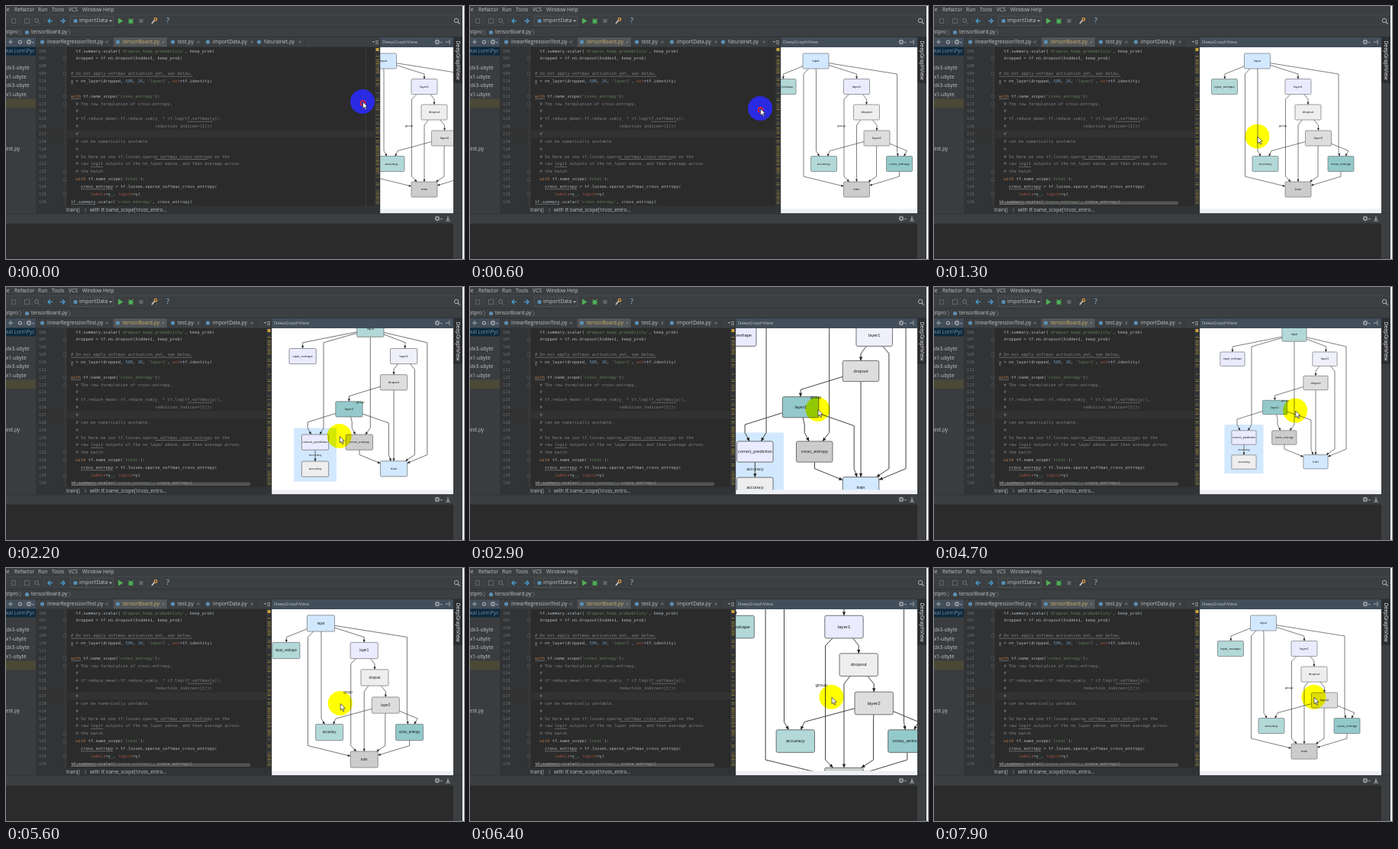
These frames come from a looping animation (600 by 331 pixels, 8000 ms). An HTML page with a canvas:

```html
<!DOCTYPE html>
<html lang="en">
<head>
<meta charset="utf-8">
<title>Graph view in an editor</title>
<style>
html, body { margin: 0; width: 100%; height: 100%; overflow: hidden; background: #2b2b2b; }
canvas { display: block; width: 600px; height: 331px; }
</style>
</head>
<body>
<canvas id="stage" width="600" height="331"></canvas>
<script>
const c = document.getElementById('stage').getContext('2d');
const LOOP = 8000, UI = '"Open Sans", "Noto Sans", sans-serif';
const MONO = '"DejaVu Sans Mono", monospace', ARIAL = '"Liberation Sans", Arial, sans-serif';
const PANEL = '#3c3f41', HEADER = '#434e5b', LINE = '#2f3133', TEXT = '#c0c2c4';
const CODE_SIZE = 5.4, CODE_X = 85, CODE_Y = 59.2, LINE_H = 9.85, CHAR_W = 3.25;

const code = `  tf.summary.scalar('dropout_keep_probability', keep_prob)
  dropped = tf.nn.dropout(hidden1, keep_prob)

# Do not apply softmax activation yet, see below.
y = nn_layer(dropped, 500, 10, 'layer2', act=tf.identity)

with tf.name_scope('cross_entropy'):
  # The raw formulation of cross-entropy,
  #
  # tf.reduce_mean(-tf.reduce_sum(y_ * tf.log(tf.softmax(y)),
  #                               reduction_indices=[1]))
  #
  # can be numerically unstable.
  #
  # So here we use tf.losses.sparse_softmax_cross_entropy on the
  # raw logit outputs of the nn_layer above, and then average across
  # the batch.
  with tf.name_scope('total'):
    cross_entropy = tf.losses.sparse_softmax_cross_entropy(
        labels=y_, logits=y)
tf.summary.scalar('cross_entropy', cross_entropy)`.split('\n');
// Line, column, length
const underlines = [[3, 0, 49], [4, 0, 1], [6, 0, 4], [9, 47, 10], [14, 34, 21],
  [15, 8, 5], [18, 4, 13], [20, 0, 10]];

const collapsed = {
  w: 34, h: 20, font: 4.2, label: ['group', 457, 157],
  nodes: {
    input: [423.5, 72, '#d2e8fe'], input_reshape: [380.5, 105.5, '#b2d8d8'],
    layer1: [477, 105.5, '#ebebff'], dropout: [490, 139, '#eeeeee'],
    layer2: [503.5, 173, '#dddddd'], accuracy: [434, 206.5, '#b2d8d8'],
    cross_entropy: [533, 206.5, '#93c9ca'], train: [477, 240, '#cccccc']
  },
  edges: [
    ['input', 'input_reshape', [381, 89]], ['input', 'layer1', [477, 89]],
    ['input', 'accuracy', [424, 89], [424, 189.5]], ['input', 'train', [407.5, 89], [407.5, 223]],
    ['input', 'cross_entropy', [530, 89], [530, 189.5]],
    ['layer1', 'dropout', [490, 122]], ['layer1', 'train', [460.5, 122], [460.5, 223]],
    ['dropout', 'layer2', [503.5, 156]], ['dropout', 'train', [477, 156]],
    ['layer2', 'accuracy', [442, 189.5]], ['layer2', 'cross_entropy', [543, 189.5]],
    ['layer2', 'train', [503, 190], [503, 223]], ['cross_entropy', 'train', [533, 223]]
  ]
};
const expanded = {
  w: 32.2, h: 18.4, font: 3.8, label: ['group', 460, 149],
  cluster: [380.5, 180, 51, 64, 'accuracy', 406, 212.5],
  nodes: {
    input: [472, 62, '#b2d8d8'], input_reshape: [391, 94.2, '#ebebff'],
    layer1: [512, 94.2, '#f0f0fa'], dropout: [500, 125.5, '#dddddd'],
    layer2: [446.5, 157.5, '#93c9ca'], correct_prediction: [406, 197, '#ebebff'],
    cross_entropy: [458.8, 197, '#cccccc'], accuracy: [406, 229, '#eeeeee'],
    train: [500, 228.7, '#d2e8fe']
  },
  edges: [
    ['input', 'input_reshape', [391, 78]], ['input', 'correct_prediction', [416, 78], [416, 180]],
    ['input', 'cross_entropy', [472, 78], [472, 180]], ['input', 'layer1', [514, 78]],
    ['input', 'train', [540, 78], [540, 212]],
    ['layer1', 'dropout', [500, 110]], ['layer1', 'train', [525, 110], [525, 212]],
    ['dropout', 'layer2', [446.5, 142]], ['dropout', 'train'],
    ['layer2', 'correct_prediction', [397, 173], [397, 180]],
    ['layer2', 'cross_entropy', [450, 173], [450, 180]],
    ['layer2', 'train', [494, 174], [494, 212]],
    ['cross_entropy', 'train', [459, 212]], ['correct_prediction', 'accuracy']
  ]
};

// Key poses: time, then values
const divider = [[100, 490], [1000, 348]];
const pointer = [[0, 467, 125], [900, 350, 137], [1000, 350, 138], [1300, 423.5, 170.5],
  [1800, 434, 200], [2000, 434, 200], [2900, 455.5, 160], [3600, 483.5, 155], [4500, 483.5, 155],
  [5200, 432, 188], [5350, 432, 188], [5600, 437.7, 177], [6400, 473.5, 168.7], [7100, 480, 168.7],
  [7900, 497.5, 168.7]];
const zoomExpanded = [[2000, 1, 7, 3], [2700, 1.475, -225.5, -75.1],
  [2950, 1.475, -225.5, -75.1], [3700, 1, 0, 0]];
const zoomCollapsed = [[1900, 1, 0, 0], [5400, 1.06, -36.4, -3.9], [5650, 1.06, -36.4, -3.9],
  [6250, 1.48, -216, -79.1], [6400, 1.48, -216, -79.1], [7000, 1.09, -33.6, -12],
  [7100, 1.09, -33.6, -12], [7800, 1, 8, 0]];

function at(keys, t) {
  const i = keys.findIndex(k => k[0] > t);
  if (i < 0) return keys[keys.length - 1].slice(1);
  if (i === 0) return keys[0].slice(1);
  const [a, b] = [keys[i - 1], keys[i]];
  const u = (t - a[0]) / (b[0] - a[0]), e = u * u * (3 - 2 * u);
  return a.slice(1).map((v, n) => v + (b[n + 1] - v) * e);
}

function rect(x, y, w, h, color) {
  c.fillStyle = color;
  c.fillRect(x, y, w, h);
}
function text(s, x, y, size, color = TEXT, font = UI, align = 'left') {
  c.font = `${size}px ${font}`;
  c.textAlign = align;
  c.textBaseline = 'middle';
  c.fillStyle = color;
  c.fillText(s, x, y);
}
function path(points, color, width = 1, fill) {
  c.beginPath();
  points.forEach(p => c.lineTo(p[0], p[1]));
  if (fill) { c.closePath(); c.fillStyle = fill; c.fill(); }
  if (width) { c.strokeStyle = color; c.lineWidth = width; c.stroke(); }
}
function disc(x, y, r, fill) {
  c.beginPath();
  c.arc(x, y, r, 0, 7);
  c.fillStyle = fill;
  c.fill();
}
function ring(x, y, r, color, width = 1) {
  c.beginPath();
  c.arc(x, y, r, 0, 7);
  c.strokeStyle = color;
  c.lineWidth = width;
  c.stroke();
}
function clip(x, y, w, h, draw) {
  c.save();
  c.beginPath();
  c.rect(x, y, w, h);
  c.clip();
  draw();
  c.restore();
}
function gear(x, y) {
  ring(x, y, 2, '#a9abad', 1.3);
  for (let a = 0; a < 6.2; a += Math.PI / 4)
    rect(x + 3 * Math.cos(a) - .5, y + 3 * Math.sin(a) - .5, 1, 1, '#a9abad');
  path([[x + 4, y], [x + 7, y], [x + 5.5, y + 1.7]], '', 0, '#a9abad');
}
function hideIcon(x, y) {
  path([[x, y - 3], [x, y + 1]], '#a9abad');
  path([[x - 2, y], [x + 2, y], [x, y + 2.5]], '', 0, '#a9abad');
  path([[x - 3, y + 3], [x + 3, y + 3]], '#a9abad');
}
function arrowIcon(x, y, dir) {
  path([[x - 3 * dir, y], [x + 3 * dir, y]], '#4a9bd0', 1.3);
  path([[x, y - 3], [x + 3 * dir, y], [x, y + 3]], '#4a9bd0', 1.3);
}

function drawTop() {
  rect(0, 0, 600, 41, PANEL);
  [['le', -1], ['Refactor', 11], ['Run', 42], ['Tools', 60], ['VCS', 82], ['Window', 100], ['Help', 127]]
    .forEach(([s, x]) => text(s, x, 5, 6.7));
  rect(0, 11, 600, .6, '#4a4d4f');
  rect(0, 27.5, 600, .8, LINE);
  c.strokeStyle = '#606365';
  c.lineWidth = 1;
  c.strokeRect(7.5, 16.5, 5, 6);
  c.strokeRect(24.5, 16.5, 6, 6);
  ring(40, 19, 2.5, '#707375');
  path([[42, 21], [44, 23.5]], '#707375');
  [17, 34, 49, 185, 203].forEach(x => rect(x, 14, .6, 11, '#484b4d'));
  arrowIcon(58, 19.5, -1);
  arrowIcon(74, 19.5, 1);
  c.strokeStyle = '#4a4d4f';
  c.strokeRect(84.5, 13.5, 56, 12);
  disc(91, 19.5, 2.6, '#5b8fb5');
  text('importData', 96, 19.5, 7);
  path([[135, 18.5], [139, 18.5], [137, 21]], '', 0, '#b0b2b4');
  path([[147, 15.5], [153.5, 19.5], [147, 23.5]], '', 0, '#4fae57');
  disc(163.5, 20, 3, '#4fae57');
  path([[160, 16], [167, 23.5]], '#4fae57', .8);
  path([[167, 16], [160, 23.5]], '#4fae57', .8);
  rect(174.5, 17, 5, 5, '#626567');
  path([[191, 23], [195, 18]], '#c7c9cb', 1.6);
  ring(196, 17.5, 1.8, '#d99a4a', 1.3);
  text('?', 212, 19.5, 9, '#8cc4ea', `bold ${UI}`.replace('bold ', ''), 'center');
  ring(590, 19, 2.7, '#a9abad');
  path([[592, 21], [594.5, 23.5]], '#a9abad', 1.2);
  text('stpro', 0, 34.5, 6.6);
  path([[17.5, 31], [20, 34.5], [17.5, 38]], '#75787a', .8);
  disc(27.5, 34.5, 2.6, '#5b8fb5');
  text('tensorBoard.py', 33, 34.5, 6.6);
  path([[82, 31], [84.5, 34.5], [82, 38]], '#75787a', .8);
  rect(0, 40, 600, 1, LINE);
}

function drawProject() {
  rect(0, 41, 40, 231, '#3a3d3f');
  rect(0, 41, 40, 12.5, HEADER);
  path([[3, 47], [9, 47]], '#a9abad');
  path([[6, 44], [6, 50]], '#a9abad');
  ring(18.5, 47, 2, '#a9abad', 1.2);
  path([[24, 44], [24, 50]], '#70757c', .7);
  gear(30, 47);
  clip(0, 41, 39, 231, () => {
    rect(0, 53.5, 39, 11, '#0d293e');
    rect(0, 121.5, 39, 11.5, '#4b4936');
    text('kai Lorn\\Pyc', 0, 59, 6.6, '#7f929f');
    ['dx3-ubyte', 'x1-ubyte', 'dx3-ubyte', 'x1-ubyte'].forEach((s, i) => text(s, 0, 81.7 + i * 11.5, 6.6));
    text('est.py', 0, 187, 6.6);
  });
  rect(39.3, 41, .8, 231, LINE);
}

function drawTabs(d) {
  rect(40, 41, d - 40, 13, PANEL);
  const tabs = [['linearRegressionTest.py', 40, 54, 132], ['tensorBoard.py', 141, 153, 206],
    ['test.py', 212, 225, 252], ['importData.py', 258, 271, 322], ['Neuralnet.py', 327, 338, 385]];
  tabs.forEach(([name, x, tx, close], i) => {
    if (close + 6 > d - 14) return;
    if (i === 1) rect(x, 41, 70, 13, '#515658');
    disc(tx - 6.5, 47, 2.6, '#5b8fb5');
    text(name, tx, 47, 6.7, i === 1 ? '#d2b067' : TEXT);
    path([[close - 1.5, 45.5], [close + 1.5, 48.5]], '#85888a', .7);
    path([[close + 1.5, 45.5], [close - 1.5, 48.5]], '#85888a', .7);
    rect(close + 5.5, 42, .6, 11, LINE);
  });
  path([[d - 10, 46], [d - 7, 46], [d - 8.5, 48]], '', 0, '#b0b2b4');
  [45, 47, 49].forEach(y => rect(d - 6, y, 4, .7, '#b0b2b4'));
  rect(40, 53.4, d - 40, .8, LINE);
}

function drawCode() {
  const tokens = /(#.*|'[^']*'|\bwith\b|\b(?:act|labels|logits)(?==)|\b\d+\b)/;
  const tint = s => s[0] === '#' ? '#808080' : s[0] === "'" ? '#64805a' : s === 'with' ? '#c07a45'
    : /^\d+$/.test(s) ? '#6897bb' : '#a5533e';
  code.forEach((line, i) => {
    const y = CODE_Y + i * LINE_H;
    text(String(106 + i), 43, y, CODE_SIZE, '#6c7174', MONO);
    let x = CODE_X;
    line.split(tokens).forEach((s, n) => {
      text(s, x, y, CODE_SIZE, n % 2 ? tint(s) : '#a9b3bc', MONO);
      x += c.measureText(s).width;
    });
  });
  underlines.forEach(([row, col, length]) =>
    rect(CODE_X + col * CHAR_W, CODE_Y + row * LINE_H + 3, length * CHAR_W, .6, '#85888a'));
}

function drawEditor(d) {
  rect(40, 54, 40, 208, '#313335');
  rect(80, 54, d - 80, 208, '#2b2b2b');
  rect(40, 162.5, d - 46, 9.8, '#323232');
  rect(471, 54, .7, 208, '#424445');
  rect(77, 54, .6, 208, '#45484a');
  [1, 3, 6, 7, 16, 17, 19].forEach(i => {
    rect(74.8, 57 + i * LINE_H, 4.4, 4.4, '#505355');
    rect(75.5, 57.7 + i * LINE_H, 3, 3, '#313335');
  });
  clip(40, 54, d - 47, 208, drawCode);
  const view = d - 92, content = 280;
  if (view < content) rect(86, 255.5, view * view / content, 4.5, 'rgba(125,125,125,.5)');
  rect(d - 7, 54, 7, 208, '#313335');
  rect(d - 5.5, 55, 4, 4, '#c9a13d');
  let seed = 11;
  for (let y = 63; y < 258; y += 2.4) {
    seed = seed * 73 % 1009;
    if (seed % 5 < 3) rect(d - 5.5, y, 4.5, .9, seed % 2 ? '#a58a35' : '#75693e');
  }
  rect(40, 261.5, d - 40, 10.5, '#313335');
  text('train()', 79, 267, 6.4);
  path([[103, 264.5], [105, 267], [103, 269.5]], '#85888a', .7);
  text("with tf.name_scope('cross_entro...", 110, 267, 6.4);
}

// Point where the segment from a node's centre towards p leaves its box
function border(g, [x, y], p) {
  const dx = p[0] - x, dy = p[1] - y;
  const k = Math.min(g.w / 2 / Math.abs(dx), g.h / 2 / Math.abs(dy));
  return [x + dx * k, y + dy * k];
}

function drawGraph(g) {
  if (g.cluster) {
    const [x, y, w, h, name, tx, ty] = g.cluster;
    rect(x, y, w, h, '#d2e8fe');
    text(name, tx, ty, g.font, '#222', ARIAL, 'center');
  }
  g.edges.forEach(([from, to, ...via]) => {
    const a = g.nodes[from], b = g.nodes[to];
    const end = border(g, b, via[via.length - 1] || a);
    const line = [border(g, a, via[0] || b), ...via, end];
    path(line, '#3a3a3a', .65);
    const prev = line[line.length - 2], angle = Math.atan2(end[1] - prev[1], end[0] - prev[0]);
    const wing = s => [end[0] - 3.6 * Math.cos(angle + s), end[1] - 3.6 * Math.sin(angle + s)];
    path([end, wing(.42), wing(-.42)], '', 0, '#222');
  });
  for (const [name, [x, y, fill]] of Object.entries(g.nodes)) {
    c.beginPath();
    c.roundRect(x - g.w / 2, y - g.h / 2, g.w, g.h, 1.4);
    c.fillStyle = fill;
    c.fill();
    c.strokeStyle = '#5c6064';
    c.lineWidth = .6;
    c.stroke();
    text(name, x, y, g.font, '#1c1c1c', ARIAL, 'center');
  }
  text(g.label[0], g.label[1], g.label[2], g.font, '#222', ARIAL, 'center');
}

function drawView(t, d) {
  rect(d, 41, 586 - d, 13, HEADER);
  text('DeepGraphView', d + 3, 47, 6.1);
  gear(565, 47);
  path([[576, 47], [580, 47]], '#a9abad');
  path([[581, 44], [581, 50]], '#a9abad');
  rect(d, 54, 586 - d, 212, '#fff');
  rect(d, 265.5, 586 - d, 6, '#eef0f5');
  const open = t >= 1900 && t < 5400;
  const [scale, x, y] = at(open ? zoomExpanded : zoomCollapsed, t < 1900 ? 0 : t);
  clip(d, 54, 586 - d, 211.5, () => {
    c.translate(x + (d - 348) / 2, y);
    c.scale(scale, scale);
    drawGraph(open ? expanded : collapsed);
  });
  rect(d - .6, 41, .8, 231, LINE);
}

function drawFrame() {
  rect(586, 41, 14, 231, PANEL);
  rect(586, 41, 12, 60, '#2c2e30');
  c.save();
  c.translate(591.7, 71);
  c.rotate(Math.PI / 2);
  text('DeepGraphView', 0, 0, 6.8, '#f0f0f0', UI, 'center');
  c.restore();
  rect(0, 271.5, 600, 13.5, PANEL);
  rect(0, 271.5, 600, .8, LINE);
  gear(565, 278);
  hideIcon(579, 278);
  rect(0, 284.5, 600, 46.5, '#2b2b2b');
  rect(586, 272, 14, 59, PANEL);
  rect(598, 0, 2, 331, '#fff');
}

function drawPointer(t) {
  const [x, y] = at(pointer, t), pressed = t < 1000;
  // The idle highlight tints what lies below it
  c.globalCompositeOperation = pressed ? 'source-over' : 'multiply';
  disc(x, y, 16, pressed ? '#2a2ae2' : '#ffff00');
  c.globalCompositeOperation = 'source-over';
  if (pressed) ring(x + .5, y + 2, 3, '#e8202a', 1.6);
  const tip = [[0, 0], [0, 8.5], [2, 6.8], [3.4, 10], [4.8, 9.4], [3.5, 6.3], [6, 6], [0, 0]];
  path(tip.map(p => [x + .5 + p[0], y + .5 + p[1]]), '#222', .7, '#fff');
}

function draw(now) {
  const t = now % LOOP, [d] = at(divider, t);
  drawTop();
  drawProject();
  drawTabs(d);
  drawEditor(d);
  drawView(t, d);
  drawFrame();
  drawPointer(t);
}

const start = performance.now();
function tick() {
  draw(performance.now() - start);
  requestAnimationFrame(tick);
}
tick();
</script>
</body>
</html>
```
